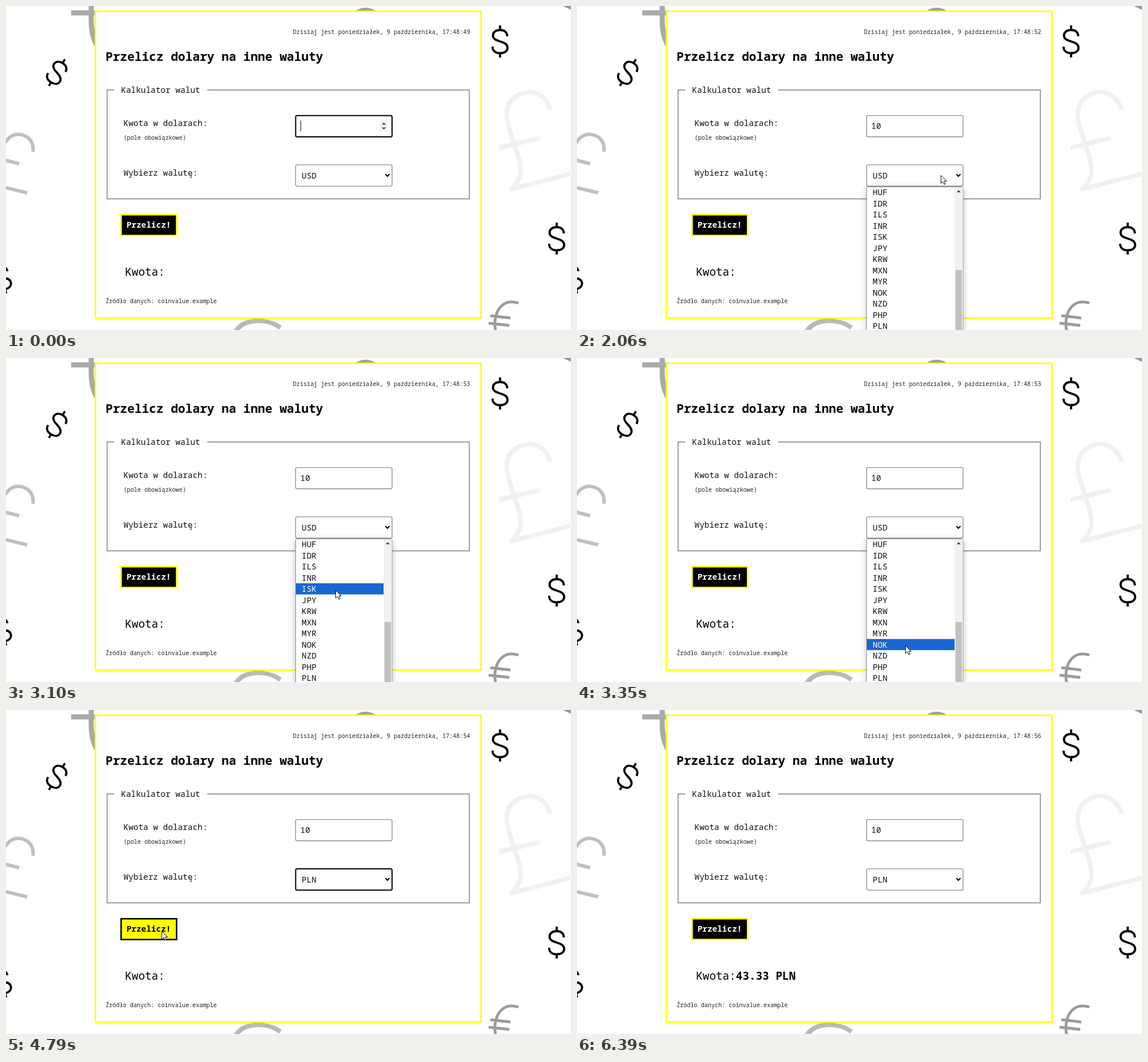
Animation of 988 by 567 pixels, one loop 7070 ms. Source, as an HTML page:

```html
<!DOCTYPE html>
<html lang="pl">
<head>
<meta charset="utf-8">
<title>Kalkulator walut</title>
<style>
  html, body { margin: 0; width: 100%; height: 100%; overflow: hidden; background: #fff; }
  svg { display: block; width: 988px; height: 567px; }
  text { font: 300 14.4px "Noto Sans Mono", "DejaVu Sans Mono", monospace; fill: #111; white-space: pre; }
  .small { font-size: 10.15px; fill: #222; }
  .title { font-size: 21.15px; font-weight: 700; fill: #000; }
  .sum { font-size: 19.35px; fill: #000; }
  .bold { font-weight: 700; }
  .symbols path, .symbols use { fill: none; }
  .box { fill: #fff; stroke: #767676; stroke-width: 1.1; }
  .box.focus { stroke: #000; stroke-width: 2; }
  .shadow { filter: drop-shadow(0 2px 6px rgba(0, 0, 0, .25)); }
</style>
</head>
<body>
<svg viewBox="0 0 988 567">
  <defs>
    <path id="dollar" stroke="#000" stroke-width="3.8" d="M12.5 -9C12.5 -16.5 7 -20 0 -20C-7 -20 -12.5 -16.5 -12.5 -10.5C-12.5 -4 -6.5 -2 0 0C7 2 13 4.5 13 11C13 17 8 20.5 0 20.5C-8 20.5 -13.2 16.5 -13.2 9M0 -28V-20M0 20V28"/>
  </defs>

  <g class="symbols">
    <path stroke="#a9a9a9" stroke-width="9" d="M114 12H160M149 0V22C149 44 152 58 160 70"/>
    <path stroke="#9ca1a5" stroke-width="8" d="M608 16Q629 -2 650 16"/>
    <path stroke="#8b9aa4" stroke-width="8" d="M970 -6L992 4"/>
    <path stroke="#bfbfbf" stroke-width="6" d="M-4 245C2 229 15 221 30 226C43 230 49 242 47 255M-4 269L23 276M-4 317L37 327"/>
    <path stroke="#f1f1f1" stroke-width="8" d="M952 182C945 156 924 147 905 152C883 158 872 176 877 201C881 224 893 250 898 272C903 294 897 308 884 320M863 248L933 231M881 321L987 294"/>
    <path stroke="#b9b9b9" stroke-width="8" d="M400 572C415 545 456 546 480 563"/>
    <path stroke="#9b9b9b" stroke-width="4.8" d="M896 520C876 513 862 524 857 541C854 551 854 560 857 572M847 542L882 546M844 555L880 559"/>
    <use href="#dollar" transform="translate(864 62)"/>
    <use href="#dollar" transform="translate(963 407)"/>
    <use href="#dollar" transform="translate(89 116.5) rotate(31) scale(.97)"/>
    <use href="#dollar" transform="translate(-7 476) rotate(-15)"/>
  </g>

  <rect x="156.3" y="9.2" width="674.6" height="537" fill="#fff" stroke="#ff0" stroke-width="2.6"/>
  <text class="small" x="501.8" y="49.3" id="clock"></text>
  <text class="title" x="174" y="96.2">Przelicz dolary na inne waluty</text>

  <path d="M189 147H176.7V337.6H810.2V147H352" fill="none" stroke="#808080" stroke-width="1.5"/>
  <text x="201.3" y="152.4">Kalkulator walut</text>
  <text x="205.5" y="210.2">Kwota w dolarach:</text>
  <text class="small" x="205.5" y="234.4">(pole obowiązkowe)</text>
  <text x="205.5" y="296.6">Wybierz walutę:</text>

  <rect class="box" id="amountBox" x="506.5" y="191.7" width="168.6" height="37.2" rx="2.5"/>
  <text x="514.5" y="215.3" id="amount"></text>
  <path id="caret" d="M0 200.5V219" stroke="#000"/>
  <g id="spinner">
    <path fill="#efefef" d="M654.5 201H667V219.5H654.5Z"/>
    <path fill="#444" d="M657.3 207.5H664.3L660.8 203.8ZM657.3 212.5H664.3L660.8 216.2Z"/>
  </g>

  <rect class="box" id="currencyBox" x="506.5" y="278" width="168.6" height="37.2" rx="2.5"/>
  <text x="517" y="301.6" id="currency"></text>
  <path d="M663.4 294.3L667 298L670.6 294.3" fill="none" stroke="#000" stroke-width="2"/>

  <rect id="button" x="201.3" y="365.3" width="97" height="36.4" stroke-width="2.6"/>
  <text class="bold" x="210.7" y="388" id="buttonText">Przelicz!</text>

  <text class="sum" x="208.2" y="471.6">Kwota:<tspan class="bold" id="result"></tspan></text>
  <text class="small" x="174.2" y="520.2">Źródło danych: coinvalue.example</text>

  <g id="list">
    <path class="shadow" d="M506.5 580V319Q506.5 316.5 509 316.5H672.5Q675 316.5 675 319V580Z" fill="#fff" stroke="#8c8c8c"/>
    <path fill="#f1f1f1" d="M660.5 317H674.5V567H660.5Z"/>
    <path fill="#c1c1c1" d="M662 462H673V567H662Z"/>
    <path fill="#444" d="M664 326H671L667.5 322.3Z"/>
    <rect id="highlight" x="507" width="153.3" height="19.5" fill="#1866d2"/>
  </g>

  <circle id="click" r="10.5" fill="#e8d40f" fill-opacity=".82"/>
  <path id="cursor" d="M.5 .5V14.3L3.7 11.3L5.9 16.2L8.2 15.2L6.1 10.5H10.4Z" fill="#fff" stroke="#111"/>
</svg>

<script>
const LOOP = 7070, ROW = 19.5, LIST_TOP = 316.25;
const el = id => document.getElementById(id);
const show = (id, on) => el(id).style.display = on ? '' : 'none';
const within = (t, a, b) => t >= a && t < b;

const options = 'HUF IDR ILS INR ISK JPY KRW MXN MYR NOK NZD PHP PLN'.split(' ').map((name, i) => {
  const label = document.createElementNS('http://www.w3.org/2000/svg', 'text');
  label.setAttribute('x', 517);
  label.setAttribute('y', LIST_TOP + ROW * i + 14.9);
  label.textContent = name;
  el('list').append(label);
  return label;
});

// pointer path: time, x, y
const path = [
  [1380, 978, 380], [1520, 830, 343], [1650, 675, 306], [1720, 636, 296],
  [2210, 636, 296], [2500, 612, 328], [2890, 584, 365], [2960, 581, 380],
  [3100, 576, 406], [3165, 576, 406], [3350, 574, 503], [3425, 574, 503],
  [3630, 571, 539], [3770, 571, 547], [3970, 571, 548], [4180, 573, 556],
  [4520, 573, 556], [4600, 490, 508], [4700, 325, 414], [4780, 272, 387], [LOOP, 272, 387]
];

function pointer(t) {
  const i = Math.max(1, path.findIndex(p => p[0] > t));
  const [t0, x0, y0] = path[i - 1], [t1, x1, y1] = path[i];
  const k = Math.max(0, (t - t0) / (t1 - t0));
  return [x0 + (x1 - x0) * k, y0 + (y1 - y0) * k];
}

const fade = (t, from, ms) => Math.min(1, Math.max(0, (t - from) / ms));

function draw(t) {
  const seconds = [60, 1050, 2060, 3060, 4060, 5120, 6120].filter(s => t >= s).length;
  el('clock').textContent = 'Dzisiaj jest poniedziałek, 9 października, 17:48:' + (49 + seconds);

  const typed = (t >= 330) + (t >= 590);
  const editing = t < 1790;
  el('amount').textContent = '10'.slice(0, typed);
  el('amountBox').classList.toggle('focus', editing);
  show('spinner', editing);
  show('caret', t < 1120 || within(t, 1620, 1790));
  el('caret').setAttribute('transform', `translate(${515.5 + 8.64 * typed} 0)`);

  el('currency').textContent = t < 4520 ? 'USD' : 'PLN';
  el('currencyBox').classList.toggle('focus', within(t, 4520, 5520));

  const [x, y] = pointer(t);
  const open = within(t, 1920, 4520);
  const row = Math.floor((y - LIST_TOP) / ROW);
  show('list', open);
  show('highlight', row >= 0);
  el('highlight').setAttribute('y', LIST_TOP + ROW * Math.max(0, row));
  options.forEach((o, i) => o.style.fill = i === row ? '#fff' : '');

  const hover = fade(t, 4700, 80) - fade(t, 6190, 190);
  const on = Math.round(255 * hover), off = 255 - on;
  el('button').setAttribute('fill', `rgb(${on},${on},0)`);
  el('button').setAttribute('stroke', `rgb(${off},${off},0)`);
  el('buttonText').style.fill = `rgb(${off},${off},${off})`;
  el('result').textContent = t < 5720 ? '' : '43.33 PLN';

  const at = `translate(${x} ${y})`;
  el('cursor').setAttribute('transform', at);
  el('click').setAttribute('transform', at);
  show('cursor', within(t, 1380, 6190));
  show('click', within(t, 1790, 1920) || within(t, 4390, 4520) || within(t, 5520, 5650));
}

function tick() {
  draw(performance.now() % LOOP);
  requestAnimationFrame(tick);
}
tick();
</script>
</body>
</html>
```
